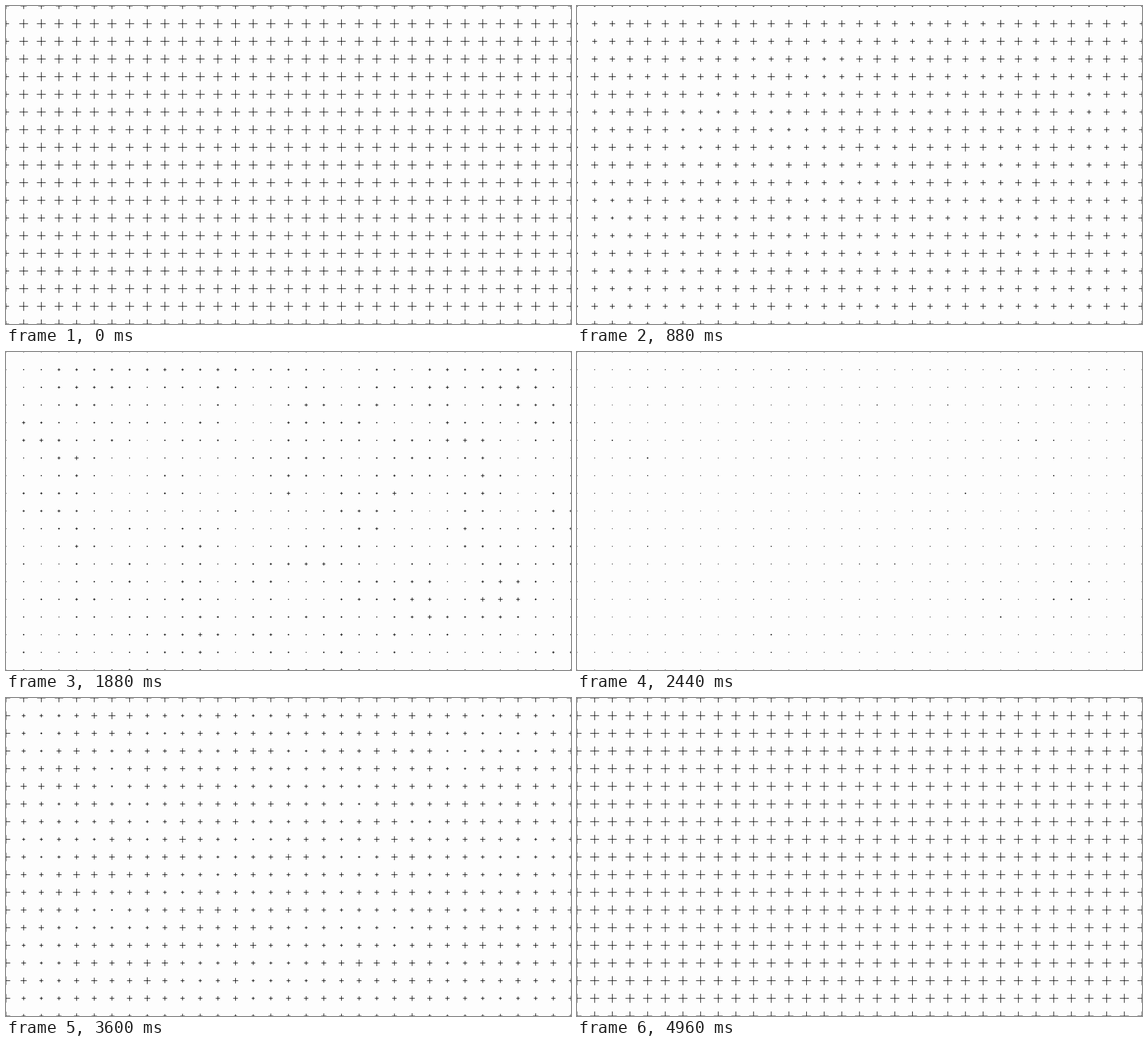
Write an HTML page with a canvas that moves like this. It is 998 px wide and 561 px high and loops after 5 s.

```html
<!DOCTYPE html>
<html lang="en">
<head>
<meta charset="utf-8">
<title>Crosses</title>
<style>
  html, body { margin: 0; width: 100%; height: 100%; overflow: hidden; background: #fdfdfd; }
  canvas { display: block; }
</style>
</head>
<body>
<canvas id="stage" width="998" height="561"></canvas>
<script>
const W = 998, H = 561, COLS = 32, ROWS = 18;
const LOOP = 5000, HALF = LOOP / 2, STEP = 40;
const MEAN_LEAD = 0.03, EDGE_LEAD = 0.4, SPREAD = 0.6;
const ctx = document.getElementById('stage').getContext('2d');

function seededRandom(seed) {
  return () => {
    seed = (Math.imul(seed, 1664525) + 1013904223) >>> 0;
    return seed / 4294967296;
  };
}

// A lead is the share of a half loop by which a cross runs ahead.
// Neighbours share random values, so that they form loose clusters.
function makeLeads(seed) {
  const random = seededRandom(seed);
  const raw = Array.from({ length: ROWS + 1 }, () =>
    Array.from({ length: COLS + 1 }, () => random() - 0.5));
  return (col, row) => {
    if (!col || !row) return EDGE_LEAD;
    const sum = raw[row][col] + raw[row - 1][col] + raw[row][col - 1] + raw[row - 1][col - 1];
    return MEAN_LEAD + SPREAD * sum / 4;
  };
}

const shrinkLead = makeLeads(17);
const growLead = makeLeads(71);

function ease(value) {
  const p = Math.min(1, Math.max(0, value));
  return p * p * (3 - 2 * p);
}

function drawCross(x, y, arm) {
  ctx.fillRect(x - arm, y - 0.5, arm * 2, 1);
  ctx.fillRect(x - 0.5, y - arm, 1, arm * 2);
}

function draw(time) {
  const t = Math.floor((time % LOOP) / STEP) * STEP;
  const growing = t >= HALF;
  const progress = (t % HALF) / HALF;

  ctx.fillStyle = '#fdfdfd';
  ctx.fillRect(0, 0, W, H);
  ctx.fillStyle = '#000';
  for (let row = 0; row <= ROWS; row++) {
    for (let col = 0; col <= COLS; col++) {
      const scale = growing
        ? ease(progress + growLead(col, row))
        : 1 - ease(progress + shrinkLead(col, row));
      drawCross(col * W / COLS, row * H / ROWS, 0.5 + 7.5 * scale);
    }
  }
}

const start = performance.now();
function tick() {
  draw(performance.now() - start);
  requestAnimationFrame(tick);
}
tick();
</script>
</body>
</html>
```
